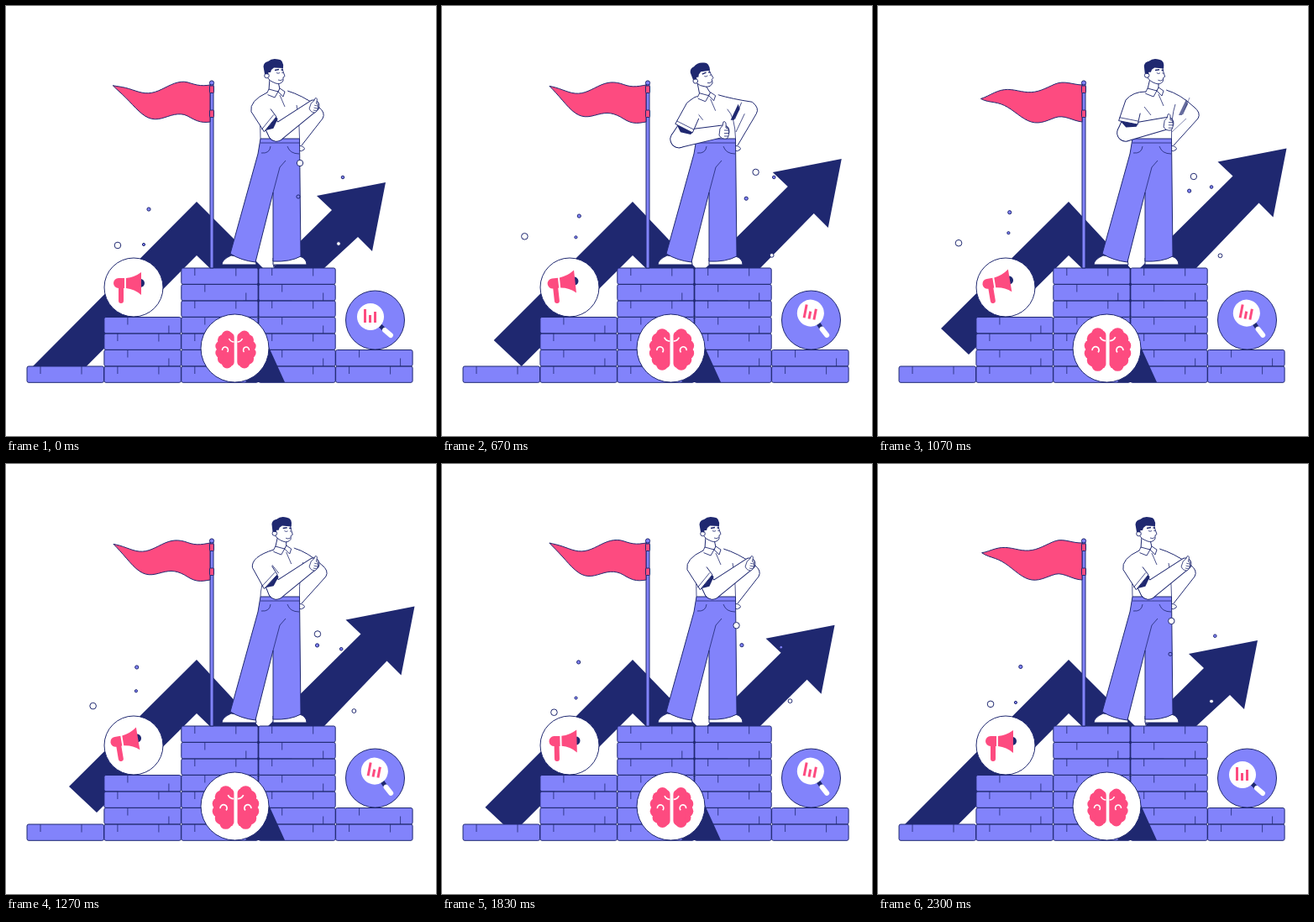
Write an HTML page with a canvas that moves like this. It is 512 by 512 pixels and loops after 2.33 s.

```html
<!DOCTYPE html>
<html lang="en">
<head>
<meta charset="utf-8">
<title>Climbing the steps</title>
<style>
html, body { margin: 0; height: 100%; overflow: hidden; background: #fff; }
canvas { display: block; width: 100vw; height: 100vh; }
</style>
</head>
<body>
<canvas id="stage" width="512" height="512"></canvas>
<script>
const ctx = document.getElementById('stage').getContext('2d');
const NAVY = '#1f2870', PURPLE = '#8283fb', PINK = '#fd4b80', WHITE = '#fff';
const LOOP = 2330, WAVE = 600, TURN = Math.PI * 2;

const mix = (a, b, k) => a + (b - a) * k;
function ease(t, from, to) {
  const k = Math.min(1, Math.max(0, (t - from) / (to - from)));
  return (1 - Math.cos(Math.PI * k)) / 2;
}
// Rises from 0 to 1, rests, then falls back
const swing = (t, a, b, c, d) => ease(t, a, b) - ease(t, c, d);

function paint(path, fill, stroke, width = 1) {
  if (fill) { ctx.fillStyle = fill; ctx.fill(path); }
  if (stroke) { ctx.strokeStyle = stroke; ctx.lineWidth = width; ctx.stroke(path); }
}
const shape = (d, fill, stroke, width) => paint(new Path2D(d), fill, stroke, width);
const line = (d, width = 0.8) => shape(d, null, NAVY, width);
const poly = (points, fill, stroke) => shape('M' + points.join('L') + 'Z', fill, stroke);
function disc(x, y, r, fill, stroke, width) {
  const p = new Path2D();
  p.arc(x, y, r, 0, TURN);
  paint(p, fill, stroke, width);
}
function box(x, y, w, h, r, fill, stroke) {
  const p = new Path2D();
  p.roundRect(x, y, w, h, r);
  paint(p, fill, stroke);
}
function placed(x, y, degrees, scale, draw) {
  ctx.save();
  ctx.translate(x, y);
  ctx.rotate(degrees * TURN / 360);
  ctx.scale(scale, scale);
  draw();
  ctx.restore();
}

function arrow(grow) {
  const tx = 32 + 43 * grow, ty = 429 - 45 * grow;
  const head = [[388, 243], [370, 226], [452, 210], [436, 292], [419, 275]]
    .map(([x, y]) => [x + 34.5 * grow, y - 40.5 * grow]);
  ctx.save();
  ctx.beginPath();
  ctx.rect(0, 0, 512, 430);
  ctx.clip();
  poly([[tx, ty], [227, 233], [312 - 6 * grow, 318], ...head, [379, 312], [312, 379],
    [227, 297], [tx + 33, ty + 31]], NAVY);
  ctx.restore();
}

function bricks() {
  [1, 4, 7, 7, 2].forEach((count, column) => {
    const x = 25 + 91.9 * column;
    for (let row = 0; row < count; row++) {
      const y = 429 - row * 19.5, shift = row % 2 ? 12 : 0;
      box(x, y, 91.5, 19.3, 2, PURPLE, NAVY);
      line(`M${x + 16 + shift},${y}v9M${x + 65 + shift},${y + (row % 2 ? 10 : 0)}v9.5`);
    }
  });
  line('M300.5,312V448', 1.4);
}

function megaphone(angle) {
  disc(152, 335, 35, WHITE, NAVY);
  placed(137, 352, angle, 1, () => {
    disc(23, -22, 5, NAVY);
    shape('M4,-28H-3A6,6 0 0 0 -3,-16V-1Q-3,2 0,2T3,-1V-16H4Z', PINK);
    shape('M6,-28Q16,-29 24,-35V-8Q16,-15 6,-16Z', PINK);
  });
}

function magnifier(angle) {
  disc(439.5, 374, 35, PURPLE, NAVY);
  placed(459, 393, angle, 1, () => {
    ctx.lineCap = 'round';
    shape('M-14,-13L-7,-6', null, NAVY, 5);
    shape('M-8,-7L-1,-1', null, WHITE, 6);
    ctx.lineCap = 'butt';
    disc(-25, -23, 16, WHITE);
    shape('M-31.5,-16V-32M-25.5,-16V-25M-19.5,-16V-29', null, PINK, 3);
  });
}

function brain(grow) {
  shape('M312,404L332,448H285Z', NAVY);
  disc(272.5, 407.5, 40.5, WHITE, NAVY);
  placed(273.5, 409, 0, 1 + 0.15 * grow, () => {
    for (const side of [-1, 1]) {
      ctx.save();
      ctx.scale(side, 1);
      for (let i = 0; i < 6; i++) {
        const a = (i - 2.5) * 0.46;
        disc(5 + 13 * Math.cos(a), 17.5 * Math.sin(a), 6.5, PINK);
      }
      box(1.8, -20, 13, 40, 5, PINK);
      shape('M10,3A3.5,3.5 0 1 1 16,1M2,-9Q6,-9 8,-13', null, WHITE, 1.5);
      ctx.restore();
    }
  });
}

function flag(t) {
  const phase = t % WAVE / WAVE;
  const tipX = 124 + 4 * Math.cos(TURN * (phase - 0.1));
  // A ripple runs from the pole to the tip, where a wider flap takes over
  const edge = (rest, ripple) => Array.from({ length: 31 }, (_, i) => {
    const u = i / 30, flap = u ** 6;
    const wave = ripple * Math.min(1, 4 * u) * (1 - flap) * Math.cos(TURN * (phase - 0.07 - 1.48 * u));
    return [mix(243, tipX, u), rest(u) + wave + 15 * flap * Math.cos(TURN * (phase - 0.55))];
  });
  const upper = edge(u => 94 + 15 * u * u, 5);
  const lower = edge(u => 138 - 7 * u - 22 * u ** 3, 6.5);
  box(243, 93, 4, 219, 0, PURPLE, NAVY);
  disc(245, 91.5, 2.6, PURPLE, NAVY);
  poly([...upper, ...lower.reverse()], PINK, NAVY);
  for (const y of [95, 124]) box(242.5, y, 5, 8.5, 1, PINK, NAVY);
}

function legs() {
  shape('M268,297Q257,302 257,308H298L297,301Z', WHITE, NAVY);
  shape('M318,300V308H358Q358,301 350,298Z', WHITE, NAVY);
  line('M257,309.5H298M318,309.5H358', 1.8);
  shape('M303,158H349.5L351,298Q338,305 318,304V222L297,305Q280,303 267,295L300,176Z', PURPLE, NAVY);
  line('M303,163H350M318,222L326,192L333,184M304,175Q314,176 315,167M335,167Q338,176 349,176');
}

function limb(ax, ay, bx, by, ra, rb) {
  const p = new Path2D(), a = Math.atan2(by - ay, bx - ax), q = TURN / 4;
  p.arc(ax, ay, ra, a + q, a - q);
  p.arc(bx, by, rb, a - q, a + q);
  p.closePath();
  return p;
}

function head() {
  shape('M9,-6L11,1L13,6.5L11,8L11,12Q8,17 2,15Q-5,13 -8,8L-9,-6Z', WHITE, NAVY, 0.9);
  disc(-8.5, 6, 2.8, WHITE, NAVY, 0.9);
  shape('M-11,4L-12.5,-5Q-12,-10 -7,-11Q-2,-15.5 5,-13.5Q12,-13 11,-3L0,-3.5L-3,-1L-4,2L-6.5,2L-7,4.5Z', NAVY);
  line('M1,-0.5L6,-1.5M8.5,-1H11', 1.5);
  line('M3,2.5Q5,4 7,2.5M9.5,2.5H11M5,11Q8,12.5 10.5,10.5');
}

function man(t) {
  const back = swing(t, 80, 320, 640, 870);
  const forward = swing(t, 640, 870, 1200, 1800);
  const hip = swing(t, 340, 660, 960, 1250);
  const nx = 321 - 7 * back + 8 * forward, ny = 100 + 5 * back - forward;
  const hx = 319 - 11 * back + 10 * forward, hy = 77 + 5 * back;
  const sx = 300 - 4 * back + 2 * forward + 6 * hip, sy = 118 + 5 * back - 2 * forward - 4 * hip;
  const ex = mix(322 - 5 * back, 282, hip), ey = 151 + 8 * back;
  const px = mix(366 - 4 * back, 335, hip), py = mix(119 + 10 * back, 149, hip);
  const fx = 379 - 3 * back + 4 * forward, fy = 129 - 6 * back;

  // far arm and torso
  shape(`M${nx + 14},${ny + 1}Q${nx + 31},${ny + 6} ${fx - 7},${fy - 9}Q${fx + 2},${fy - 2} ${fx - 2},${fy + 5}L352,166`, WHITE, NAVY);
  shape('M349,166Q357,168 355,171Q351,174 349,172', WHITE, NAVY, 0.9);
  poly([[nx - 9, ny + 2], [sx, sy], [303, 159], [350, 159], [nx + 27, ny + 20], [nx + 14, ny + 1], [nx + 4, ny - 1]], WHITE);
  line(`M${nx - 19},${ny + 33}Q303,146 303,158M${nx + 25},${ny + 18}Q349,132 349.5,158`);
  ctx.globalAlpha = hip;
  poly([[nx + 38, ny + 12], [nx + 29, ny + 31], [nx + 33, ny + 31], [nx + 40, ny + 18]], NAVY);
  line(`M${nx + 42},${ny + 10}L${nx + 34},${ny + 30}M${fx - 16},${fy + 5}L350,150`);
  ctx.globalAlpha = 1;
  legs();

  // neck, collar and placket
  poly([[hx - 5, hy + 9], [nx - 8, ny], [nx, ny + 5], [nx + 5, ny - 1], [hx + 5, hy + 13]], WHITE, NAVY);
  placed(nx, ny, 0, 1, () => {
    shape('M-8,-1L-11,5L-1,9L3,2ZM5,-2L3,2L9,8L11,2Z', WHITE, NAVY, 0.9);
    line('M5,6L11,20M-12,21L-4,31');
  });
  placed(hx, hy, 3 * forward - 12 * back, 1, head);

  // near arm
  const reach = Math.atan2(py - ey, px - ex), upper = Math.atan2(ey - sy, ex - sx);
  const forearm = limb(ex, ey, px, py, 9.5, 6.5);
  const sleeve = limb(mix(sx, ex, 0.7), mix(sy, ey, 0.7), ex, ey, 8, 9.5);
  for (const p of [forearm, sleeve]) paint(p, null, NAVY, 2);
  for (const p of [forearm, sleeve]) paint(p, WHITE);

  const offset = (k, angle) => (along, out) => [
    mix(sx, ex, k) + along * Math.cos(angle) - out * Math.sin(angle),
    mix(sy, ey, k) + along * Math.sin(angle) + out * Math.cos(angle)];
  const shoulder = offset(0, upper), cuff = offset(0.68, upper - 0.3 * (1 - hip));
  poly([cuff(0, 10), cuff(0, -11), cuff(3, -10), cuff(6, 2)], NAVY);
  shape(`M${[nx - 10, ny + 3]}Q${shoulder(-10, 6)} ${shoulder(2, 11)}L${cuff(0, 12)}L${cuff(0, -11)}L${shoulder(12, -10)}`, WHITE, NAVY);
  line(`M${cuff(-4, 12)}L${cuff(-4, -11)}`);

  placed(px + 1, py, reach * -28 - 5, mix(0.85, 1, hip), () => {
    shape('M-6,5L-5,-3Q-1,-6 -1,-11Q3,-13 2,-4L5,-3Q7,6 3,9Q-3,10 -6,5Z', WHITE, NAVY, 0.9);
    line('M0,-1H5.5M0,2.5H6M0,6H5');
  });
}

// Each dot: radius, fill, home, far point offset, sideways bow
const dots = [
  [2.1, PURPLE, [170, 242], [-14, 2], [2, 7]],
  [3.8, WHITE, [133, 285], [-34, 0], [-14, -11]],
  [1.6, PURPLE, [164, 284], [-9, -14], [1, 0]],
  [1.8, PURPLE, [401, 204], [-3, 14], [-4, -9]],
  [3.7, WHITE, [350, 187], [24, 16], [9, 1]],
  [2.1, PURPLE, [348, 227], [23, -9], [0, 8]],
  [2.4, WHITE, [396, 283], [15, 13], [-13, 6]]
];

function drift(t) {
  const a = TURN * t / LOOP, out = (1 - Math.cos(a)) / 2, bow = Math.sin(a);
  for (const [r, fill, home, far, side] of dots) {
    const [x, y] = home.map((v, i) => v + far[i] * out + side[i] * bow);
    disc(x, y, r, fill, NAVY, 1);
  }
}

function frame(now) {
  const t = now % LOOP, grow = swing(t, 60, 1040, 1300, 2300);
  ctx.fillStyle = WHITE;
  ctx.fillRect(0, 0, 512, 512);
  ctx.lineJoin = 'round';
  arrow(grow);
  bricks();
  brain(grow);
  megaphone(-9.5 * swing(t, 200, 980, 1300, 2000));
  magnifier(11 * swing(t, 0, 300, 1880, 2290));
  flag(t);
  man(t);
  drift(t);
}

const start = performance.now();
(function tick() {
  frame(performance.now() - start);
  requestAnimationFrame(tick);
})();
</script>
</body>
</html>
```
